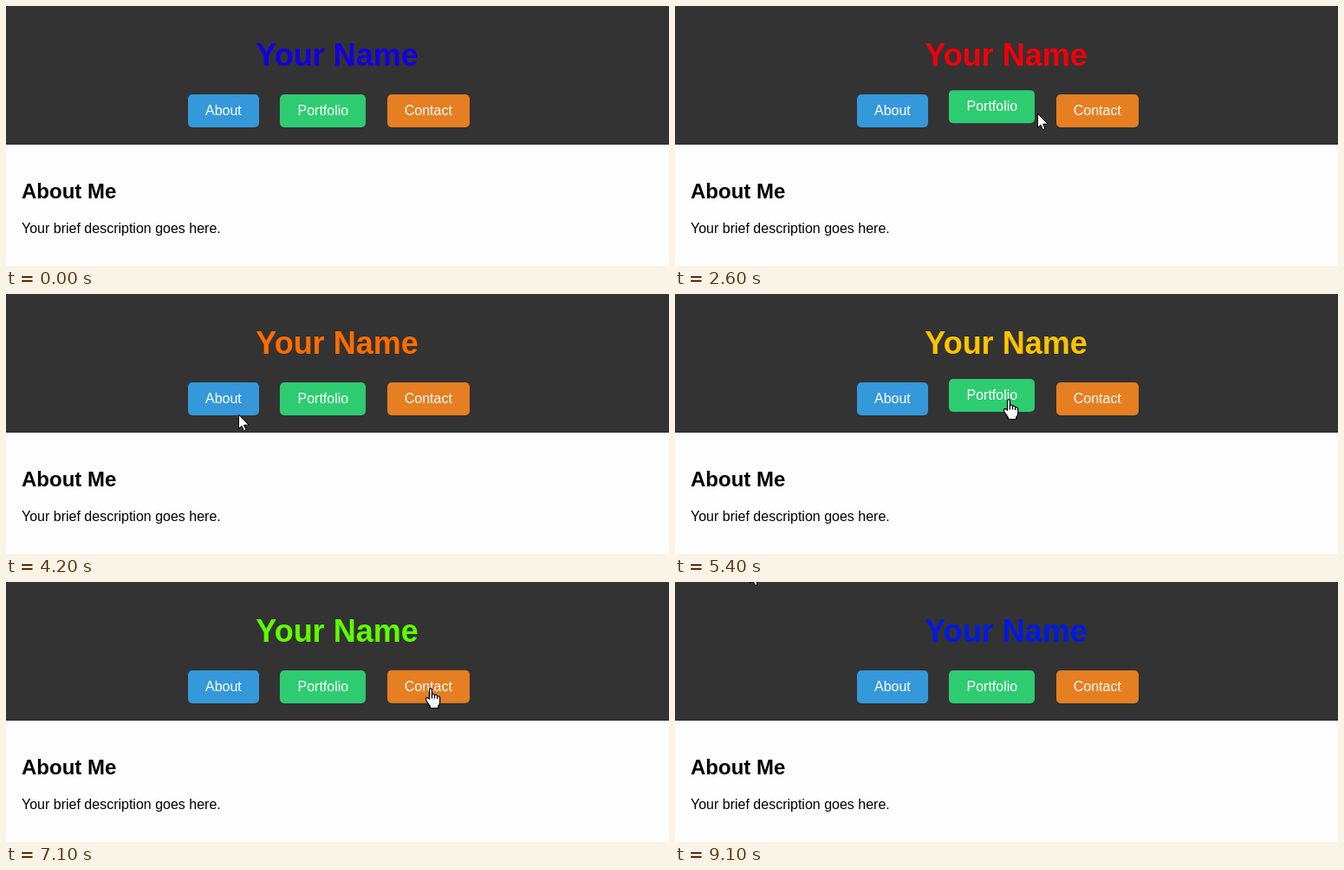
An HTML page that plays this animation: 765 px wide and 300 px high, repeating every 9.2 s.

```html
<!DOCTYPE html>
<html lang="en">
<head>
<meta charset="utf-8">
<title>Portfolio</title>
<style>
  html, body { margin: 0; width: 100%; height: 100%; overflow: hidden; background: #fefefe; }
  svg { display: block; font: 16px Arial, "Liberation Sans", sans-serif; --t: 0; }
  .title {
    font-size: 36px; font-weight: bold; text-anchor: middle;
    animation: rainbow 10s ease infinite paused;
    animation-delay: calc((var(--t) + 6690) * -1ms);
  }
  .heading { font-size: 24px; font-weight: bold; }
  .button text { fill: #fff; }
  .cursor { fill: #fff; stroke: #000; stroke-linejoin: round; stroke-linecap: round; }
  @keyframes rainbow {
    0%, 100% { fill: #ff0000; }
    16% { fill: #ff7f00; }
    32% { fill: #ffff00; }
    48% { fill: #00ff00; }
    64% { fill: #0000ff; }
    80% { fill: #4b0082; }
  }
</style>
</head>
<body>
<svg id="stage" width="765" height="300" viewBox="0 0 765 300">
  <rect width="765" height="160" fill="#333"/>
  <text class="title" x="382" y="69">Your Name</text>
  <g class="button">
    <rect x="210" y="102" width="82" height="38" rx="5" fill="#3498db"/>
    <text x="230" y="126">About</text>
  </g>
  <g class="button">
    <rect x="316" y="102" width="99" height="38" rx="5" fill="#2ecc71"/>
    <text x="336.5" y="126">Portfolio</text>
  </g>
  <g class="button">
    <rect x="440" y="102" width="95" height="38" rx="5" fill="#e67e22"/>
    <text x="459.7" y="126">Contact</text>
  </g>
  <text class="heading" x="18" y="222">About Me</text>
  <text x="18" y="262">Your brief description goes here.</text>
  <g class="cursor" id="cursor">
    <path id="arrow" d="M.5 .5V16.5L4 13.2 6.4 18.8 9 17.7 6.6 12.2H11.9Z"/>
    <g id="hand" stroke-width="1.2">
      <path d="M-1.5 2Q0 -.6 1.5 2V7.5Q4 6.4 4.6 8.5 7 7.5 7.6 9.7 10.6 9.2 10.7 11.7V16.5Q10.7 19 8.8 21V23.5H-.6V21.5L-5 15Q-6.5 11.8 -4.3 11.3 -2.8 11.3 -1.5 13.2Z"/>
      <path fill="none" d="M1.5 7.5V12M4.6 8.5V12M7.6 9.7V12.5"/>
    </g>
  </g>
</svg>
<script>
const LOOP = 9200, STEP = 100, FADE = 300, LIFT = 5;

// Turning points of the pointer: time, x, y
const path = [
  [0, 28, -40], [700, 28, -12], [1400, 212, 112], [1800, 236, 127],
  [2600, 418, 124], [2900, 500, 124], [3700, 285, 128], [3900, 270, 146],
  [4200, 268, 139], [5200, 380, 143], [5400, 385, 121], [6300, 485, 126],
  [6600, 491, 146], [7070, 491, 145], [7100, 490, 122], [7400, 474, 104],
  [7800, 366, -54], [8900, 54, -30], [9100, 86, -15], [LOOP, 28, -40]
];

const $ = id => document.getElementById(id);

// cubic-bezier(.25, .1, .25, 1)
function ease(x) {
  if (x <= 0 || x >= 1) return x <= 0 ? 0 : 1;
  const curve = (a, b, s) => 3 * a * s * (1 - s) ** 2 + 3 * b * s * s * (1 - s) + s ** 3;
  let lo = 0, hi = 1;
  for (let i = 0; i < 20; i++) {
    const mid = (lo + hi) / 2;
    if (curve(.25, .25, mid) < x) lo = mid; else hi = mid;
  }
  return curve(.1, 1, lo);
}

function pointer(t) {
  const i = path.findIndex(p => p[0] > t);
  const [t0, x0, y0] = path[i - 1], [t1, x1, y1] = path[i];
  const k = (t - t0) / (t1 - t0);
  return [x0 + (x1 - x0) * k, y0 + (y1 - y0) * k];
}

// A button's lower edge rises while hovered, so test midway
function hit(box, t) {
  const [x, y] = pointer(t);
  return x >= box.x && x <= box.x + box.width &&
    y >= box.y && y <= box.y + box.height - LIFT / 2;
}

// Times at which the pointer enters and leaves a box
function findSpans(box) {
  const spans = [];
  let inside = false;
  for (let t = 0; t < LOOP; t++) {
    if (hit(box, t) === inside) continue;
    inside = !inside;
    if (inside) spans.push([t, LOOP]);
    else spans[spans.length - 1][1] = t;
  }
  return spans;
}

const buttons = [...document.querySelectorAll('.button')].map(node => {
  const box = node.querySelector('rect').getBBox();
  return { node, box, spans: findSpans(box) };
});

function lift(spans, t) {
  return spans.reduce((sum, [enter, leave]) => {
    const top = ease((Math.min(t, leave) - enter) / FADE);
    return sum + LIFT * top * (1 - ease((t - leave) / FADE));
  }, 0);
}

function draw(t) {
  $('stage').style.setProperty('--t', t);
  for (const { node, spans } of buttons) {
    node.setAttribute('transform', `translate(0 ${-lift(spans, t)})`);
  }
  const over = buttons.some(({ box }) => hit(box, t));
  $('cursor').setAttribute('transform', `translate(${pointer(t).map(Math.round)})`);
  $('arrow').style.display = over ? 'none' : '';
  $('hand').style.display = over ? '' : 'none';
}

const start = performance.now();
function tick() {
  const t = (performance.now() - start) % LOOP;
  draw(Math.floor(t / STEP) * STEP);
  requestAnimationFrame(tick);
}
tick();
</script>
</body>
</html>
```
